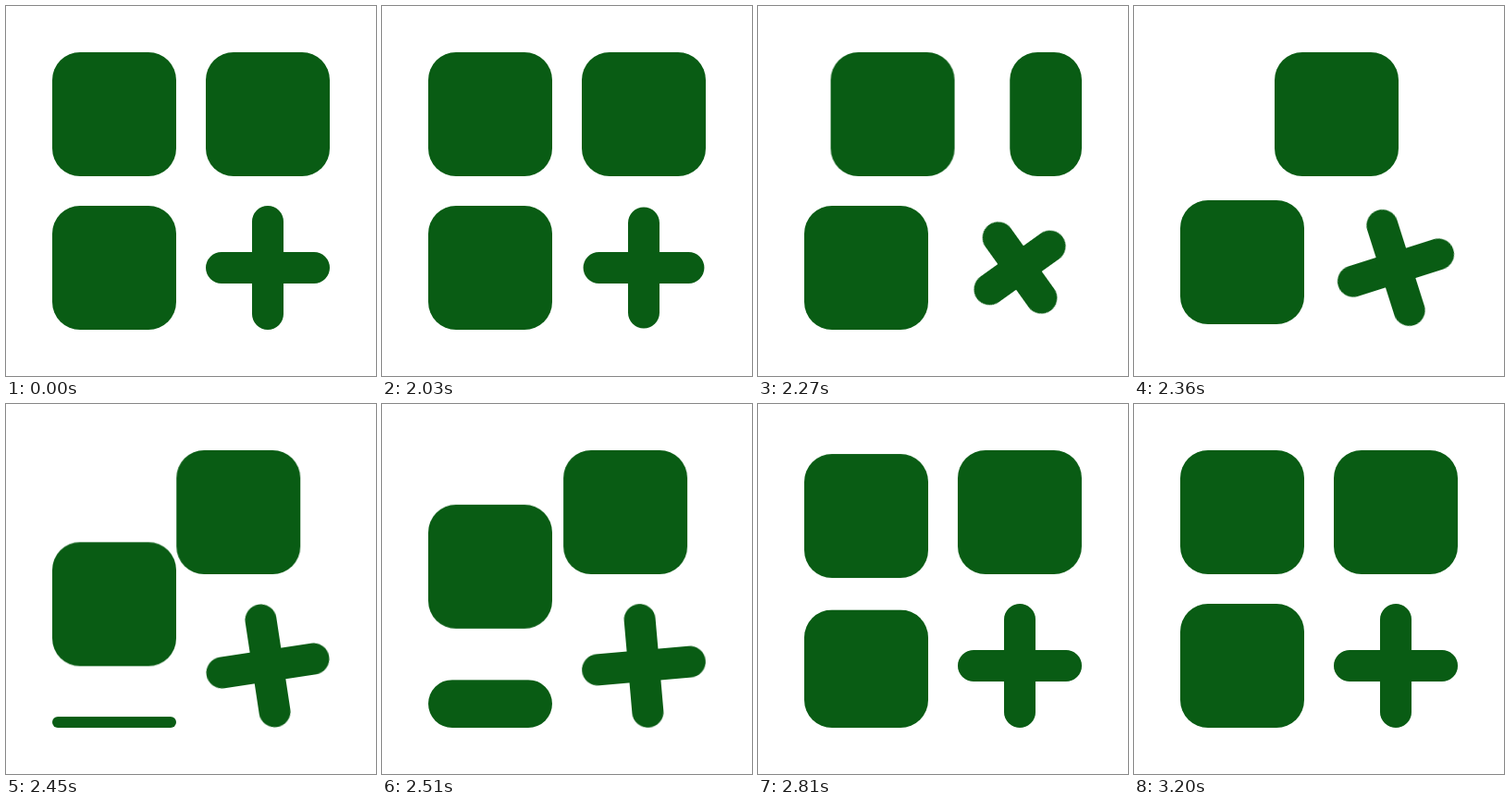
These frames come from a looping animation (400x400 px, 3.23 s). An HTML page without scripts:

```html
<!DOCTYPE html>
<html lang="en">
<head>
<meta charset="utf-8">
<title>Add tile</title>
<style>
  html, body { margin: 0; width: 100%; height: 100%; overflow: hidden; background: #fff; }
  svg { display: block; width: 100%; height: 100%; fill: #095c14; }

  .tile, .spin { animation: 3230ms cubic-bezier(.35, 0, 0, 1) infinite; }
  .tile { width: 134px; height: 134px; clip-path: inset(0% 0% 0% 0% round 30px); }
  .slide { animation-name: slide; }
  .leave { animation-name: leave; animation-timing-function: cubic-bezier(.33, 0, .67, .33); }
  .rise  { animation-name: rise; }
  .enter { animation-name: enter; }
  .spin  { animation-name: spin; }
  .plus  {
    animation: pinch 3230ms cubic-bezier(.364, 0, .636, 1) infinite;
    fill: none; stroke: #095c14; stroke-width: 34; stroke-linecap: round;
  }

  /* top-left tile takes the top-right place */
  @keyframes slide {
    0%, 66.75% { transform: translateX(0); }
    87.88%, 100% { transform: translateX(166px); }
  }
  /* top-right tile collapses against its right edge */
  @keyframes leave {
    0%, 65.54% { clip-path: inset(0% 0% 0% 0% round 30px); }
    72.88%, 100% { clip-path: inset(0% 0% 0% 100% round 30px); }
  }
  /* bottom-left tile takes the top-left place */
  @keyframes rise {
    0%, 71.07% { transform: translateY(0); }
    92.2%, 100% { transform: translateY(-166px); }
  }
  /* new tile grows from the bottom edge */
  @keyframes enter {
    0%, 73.07% { clip-path: inset(100% 0% 0% 0% round 30px); }
    93.92%, 100% { clip-path: inset(0% 0% 0% 0% round 30px); }
  }
  @keyframes spin {
    0%, 64.06% { transform: rotate(0deg); }
    85.18%, 100% { transform: rotate(90deg); }
  }
  /* arms shorten, then stretch back */
  @keyframes pinch {
    0%, 61.92% { d: path("M0 -50L0 50M-50 0L50 0"); }
    66.75% { d: path("M0 -33.3L0 33.3M-33.3 0L33.3 0"); }
    74.83%, 100% { d: path("M0 -50L0 50M-50 0L50 0"); }
  }
</style>
</head>
<body>
<svg viewBox="0 0 400 400">
  <rect class="tile slide" x="50" y="50"/>
  <rect class="tile leave" x="216" y="50"/>
  <rect class="tile rise" x="50" y="216"/>
  <rect class="tile enter" x="50" y="216"/>
  <g transform="translate(283 283)">
    <g class="spin"><path class="plus" d="M0 -50L0 50M-50 0L50 0"/></g>
  </g>
</svg>
</body>
</html>
```
